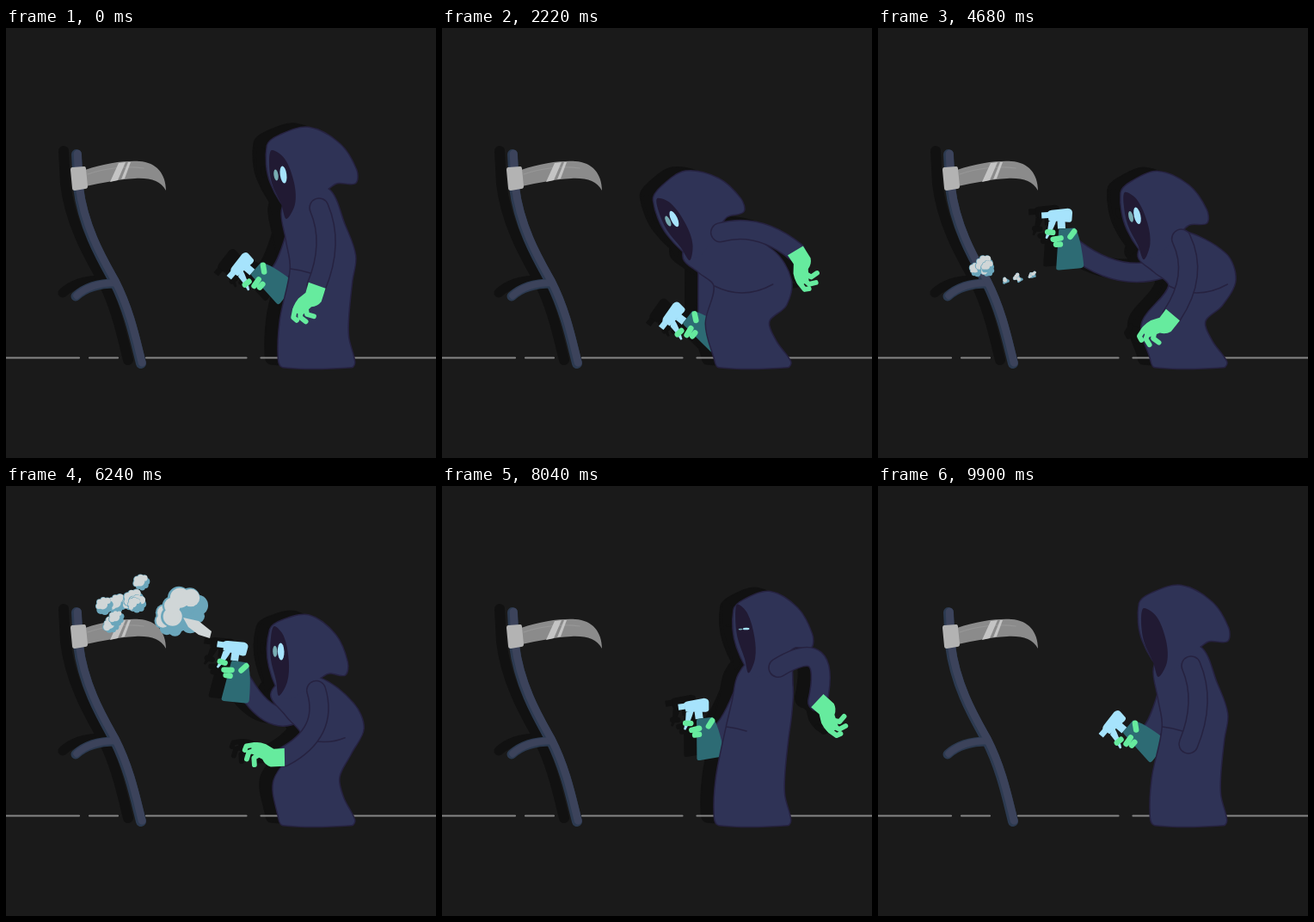
An HTML page with a canvas for the animation above (9.93 s loop, 500 px wide and 500 px high).

```html
<!DOCTYPE html>
<html lang="en">
<head>
<meta charset="utf-8">
<title>Cleaning the scythe</title>
<style>
html, body { margin: 0; height: 100%; overflow: hidden; background: #1a1a1a; }
canvas { display: block; width: 100vw; height: 100vh; }
</style>
</head>
<body>
<canvas id="stage" width="500" height="500"></canvas>
<script>
const g = document.getElementById('stage').getContext('2d');
const LOOP = 9930, LAST = 9900, SHADOW = '#111111';
const CLOAK = '#2f3356', EDGE = '#262240', GREEN = '#66eb9e', ICE = '#a6e3fc';

// head: x, y, angle, turn; stance: squat, eye opening; hand and bottle: x, y, angle
const rest = { head: [304, 140, 0, 0], stance: [0, 1], hand: [361, 300, 120], bottle: [290, 280, -49] };
const windUp = { ...rest, head: [306, 136, 2, 0], hand: [436, 238, 50] };
const crouch = { head: [247, 203, -17, .3], stance: [1, 1], hand: [411, 260, 70], bottle: [285, 337, -52] };
const low = { head: [283, 195, -5, .3], stance: [1, 1], hand: [342, 334, 141], bottle: [219, 233, -3] };
const aim = { head: [307, 170, 6, .5], stance: [.6, 1], hand: [323, 315, 190], bottle: [271, 204, 8] };
const inspect = { head: [351, 148, 0, .8], stance: [0, .14], hand: [329, 216, 255], bottle: [309, 267, 5] };
const cast = { ...inspect, hand: [460, 236, 35] };
const nod = { ...rest, head: [301, 145, 0, 0], stance: [0, .07], hand: [358, 300, 120] };
const keys = [
  [0, rest], [200, rest], [720, windUp], [1450, crouch], [2260, crouch], [2650, aim], [3650, aim],
  [4100, low], [5150, low], [5650, aim], [6750, aim], [7230, inspect], [7550, inspect],
  [7880, cast], [8400, nod], [8650, nod], [8950, rest], [LOOP, rest]
];

const HOOD = [0, -3, 14, -15, 48, -24, 84, -5, 103, 25, 102, 40, 81, 40, 70, 47, 31, 75, 4, 40];
const FACE = [5, 2, 20, 12, 31, 40, 32, 65, 22, 82, 16, 65, 5, 40, 2, 15];

const clamp = v => Math.max(0, Math.min(1, v));
const ease = v => v * v * (3 - 2 * v);
const rad = d => d * Math.PI / 180;
const mix = (a, b, k) => a.map((v, i) => v + (b[i] - v) * k);
const move = ([x, y], dx, dy) => [x + dx, y + dy];
const random = n => { const v = Math.sin(n * 12.9898) * 43758.5453; return v - Math.floor(v); };
const mapPoints = (flat, f) => flat.flatMap((x, i) => i % 2 ? [] : f(x, flat[i + 1]));

function spin(x, y, [ox, oy, angle]) {
  const c = Math.cos(rad(angle)), s = Math.sin(rad(angle));
  return [ox + x * c - y * s, oy + x * s + y * c];
}

function poseAt(t) {
  const i = keys.findIndex(k => k[0] > t);
  const [t0, a] = keys[i - 1], [t1, b] = keys[i];
  const k = ease((t - t0) / (t1 - t0)), p = {};
  for (const part in a) p[part] = mix(a[part], b[part], k);
  return p;
}

// two bones from shoulder to wrist
function elbow([sx, sy], [wx, wy], upper = 44, fore = 49) {
  const dist = Math.hypot(wx - sx, wy - sy), d = Math.min(dist, upper + fore);
  const ux = (wx - sx) / dist, uy = (wy - sy) / dist;
  const along = (upper ** 2 - fore ** 2 + d * d) / (2 * d);
  const out = Math.sqrt(Math.max(0, upper ** 2 - along ** 2));
  return [sx + ux * along + uy * out, sy + uy * along - ux * out];
}

// the feet stay, the hips follow the squat and the chest follows the head
function rig({ head, stance: [squat], hand, bottle }) {
  const turn = head[3], lean = head[0] - 304;
  const onHood = (x, y) => spin(x * (1 - .2 * turn), y, head);
  const onFace = (x, y) => spin(x * (1 - .38 * turn), y - 19 * turn, head);
  const nape = onHood(70, 47), chest = onHood(17 - 28 * turn * turn, 72);
  const upright = 1 - clamp(turn - .5) / .3;
  const follow = squat * lean;
  const waist = [331 + 20 * squat + .6 * follow, 280 + 20 * squat];
  const rump = [406 + 15 * squat + .27 * follow, 265 + 28 * squat];
  const belly = mix(chest, waist, .5);
  const back = move(mix(nape, rump, .5), 4 + 16 * squat, 4 - 6 * squat);
  const shoulder = move(nape, -10 + 10 * squat, 9 + 13 * upright - 13 * squat * upright);
  const side = move(belly, 10, -3), grip = spin(8, 24, bottle);
  const sag = 8 + Math.max(0, side[1] - grip[1]) * .25;
  return {
    onFace,
    hood: smooth(mapPoints(HOOD, onHood)),
    face: smooth(mapPoints(FACE, onFace)),
    body: smooth([
      ...onHood(30, 50), ...chest, ...belly, ...waist, 319 - 12 * squat, 340 + 4 * squat,
      317, 384, 322, 394, 402, 394, 405, 388,
      398 - 10 * squat, 360 + 4 * squat, 398 - 18 * squat, 335 + 6 * squat,
      402 - 2 * squat, 295 + 27 * squat, ...rump, ...back, ...nape]),
    fold: [...waist, ...move(waist, 12 + 22 * squat, 2 + 6 * squat), ...move(waist, 23 + 45 * squat, 5 - 7 * squat)],
    near: [...shoulder, ...elbow(shoulder, hand), hand[0], hand[1]],
    far: [...side, ...move(mix(side, grip, .5), 0, sag), ...grip]
  };
}

// closed curve through the points, with handles scaled to the segment length
function smooth(flat) {
  const n = flat.length / 2, path = new Path2D();
  const at = i => { i = (i + n) % n; return [flat[2 * i], flat[2 * i + 1]]; };
  const gap = (a, b) => Math.hypot(a[0] - b[0], a[1] - b[1]);
  path.moveTo(...at(0));
  for (let i = 0; i < n; i++) {
    const [a, b, c, d] = [at(i - 1), at(i), at(i + 1), at(i + 2)], len = gap(b, c);
    const u = len / (gap(a, b) + len) / 3, v = len / (gap(c, d) + len) / 3;
    path.bezierCurveTo(b[0] + (c[0] - a[0]) * u, b[1] + (c[1] - a[1]) * u,
      c[0] - (d[0] - b[0]) * v, c[1] - (d[1] - b[1]) * v, ...c);
  }
  path.closePath();
  return path;
}

// quadratic curve whose middle passes through the second point
function bend([ax, ay, mx, my, bx, by]) {
  const path = new Path2D();
  path.moveTo(ax, ay);
  path.quadraticCurveTo(2 * mx - (ax + bx) / 2, 2 * my - (ay + by) / 2, bx, by);
  return path;
}

function fill(path, color) {
  g.fillStyle = color;
  g.fill(typeof path === 'string' ? new Path2D(path) : path);
}
function stroke(path, color, width) {
  g.strokeStyle = color;
  g.lineWidth = width;
  g.stroke(typeof path === 'string' ? new Path2D(path) : path);
}
function oval(x, y, rx, ry, color, tilt = 0) {
  g.fillStyle = color;
  g.beginPath();
  g.ellipse(x, y, rx, ry, rad(tilt), 0, 7);
  g.fill();
}
function placed([x, y, angle], draw) {
  g.save();
  g.translate(x, y);
  g.rotate(rad(angle));
  draw();
  g.restore();
}

function sleeve(points, c) {
  stroke(bend(points), c(EDGE), 23.5);
  stroke(bend(points), c(CLOAK), 20.5);
}

function drawBottle(c) {
  fill('M-18-10H-11Q-14-1-23 11L-25 10Q-21 0-20-9Z', c(ICE));
  fill('M-10-9H-1V0H-10Z', c(ICE));
  fill('M-8 0H10Q16 10 18 43Q18 47 14 47L-11 48Q-15 48-14 44L-9 2Z', c('#2d6b74'));
  fill('M-21-20Q-19-22-16-22L3-23Q8-22 8-18L7-10Q7-7 3-7L-20-10Z', c(ICE));
  fill('M-28-20H-20V-13H-28Z', c(ICE));
  stroke('M4 10L9 4M-22 3L-16 4M-16 12L-7 11M-13 18L-8 18', c(GREEN), 6.5);
}

function drawHand(c) {
  fill('M1 10L-3-10.5L13-14Q20-13 24-7L37-3L40 8Q36 13 23 11L13 7Z', c(GREEN));
  stroke('M28-2L34-7L32-15M34 2L41-2L42-10M36 8L45 5L46 0', c(GREEN), 5.8);
}

function drawReaper(p, t, shade) {
  const c = color => shade || color, r = rig(p);
  sleeve(r.far, c);
  placed(p.bottle, () => drawBottle(c));
  for (const part of [r.body, r.hood]) stroke(part, c(EDGE), 3);
  for (const part of [r.body, r.hood]) fill(part, c(CLOAK));
  fill(r.face, c('#211a33'));
  if (t < LAST) {
    const lid = p.stance[1], tilt = p.head[2] - 8 * lid;
    oval(...r.onFace(10, 31), 2.6, 6.5 * lid, c('#78adb3'), tilt);
    oval(...r.onFace(18.5, 30.5), 3.8, 10 * lid, c(ICE), tilt);
  }
  stroke(bend(r.fold), c(EDGE), 1.5);
  sleeve(r.near, c);
  if (t < LAST) placed(p.hand, () => drawHand(c));
}

function drawHandle(shade) {
  const pole = 'M82 147L84 185C90 235 115 275 126 295C143 328 150 362 157 390';
  const branch = 'M81 312Q97 297 127 297';
  stroke(branch, shade || '#2c3a50', 11);
  stroke(pole, shade || '#2c3a50', 12);
  if (shade) return;
  placed([1.2, -.8, 0], () => {
    stroke(branch, '#3c435b', 8);
    stroke(pole, '#3c435b', 9);
  });
}

function drawBlade() {
  fill('M92 165C115 157 140 154 155 155C175 156 186 170 186 189C180 178 168 174 150 175C130 176 112 180 93 184Z', '#8b8b8b');
  stroke('M95 170C115 163 140 160 160 163', '#979797', 1.2);
  fill('M121 179L131 157L139 156L130 177ZM134 176L142 156L145 156L138 175Z', '#c4c4c4');
  fill('M77 162L91 161Q93 161 93 164L95 184Q95 187 92 187L80 189Q77 189 77 186L75 165Q75 162 77 162Z', '#b3b3b3');
}

// foam spreads from the nozzle along a line; dust forms in place
const FOAM = ['#6ba6bb', '#d0d6d7'], DUST = ['#526f8f', '#7b9a9a'];
const HIGH = [248, 187], DEEP = [194, 217];
const cloud = (start, end, from, line, spread, count, size, colors) =>
  ({ start, end, from, line, spread, count, size, colors });
const clouds = [
  cloud(2880, 4060, HIGH, [107, 155, 146, 82], 12, 9, 13, FOAM),
  cloud(2780, 4060, HIGH, [188, 164, 207, 130], 3, 2, 30, FOAM),
  cloud(4300, 5110, DEEP, [108, 280, 134, 284], 6, 4, 11, FOAM),
  cloud(4380, 5110, DEEP, [148, 297, 186, 290], 4, 5, 5, FOAM),
  cloud(5850, 7080, HIGH, [106, 152, 162, 124], 14, 9, 12, FOAM),
  cloud(5750, 7080, HIGH, [190, 163, 214, 141], 2, 2, 30, FOAM),
  cloud(8220, 8970, null, [118, 282, 144, 288], 4, 3, 18, DUST),
  cloud(8240, 8970, null, [112, 185, 112, 234], 9, 6, 13, DUST),
  cloud(8260, 8970, null, [176, 181, 222, 196], 7, 5, 10, DUST),
  cloud(8280, 8970, null, [185, 263, 211, 273], 6, 4, 10, DUST),
  cloud(8260, 8970, null, [98, 236, 182, 264], 14, 12, 3.5, DUST)
];

// lobes shrink while keeping their places, so a fading puff breaks into dots
function drawPuff(x, y, r, grow, fade, seed, [dark, light]) {
  const lobes = r < 5 ? 3 : 8, list = [[x, y, r * .66 * grow * fade, Math.PI / 2]];
  for (let i = 0; i < lobes; i++) {
    const a = (i / lobes * 2 + random(seed)) * Math.PI;
    const size = r * (.3 + .2 * random(seed + i * 7 + 1)) * grow * fade;
    list.push([x + Math.cos(a) * r * .62 * grow, y + Math.sin(a) * r * .62 * grow, size, a]);
  }
  for (const [lx, ly, s] of list) oval(lx, ly, s, s, dark);
  if (r < 20) oval(x - r * .15, y - r * .1, r * .55 * grow * fade, r * .55 * grow * fade, light);
  for (const [lx, ly, s, a] of list)
    if (Math.cos(a) + Math.sin(a) < .1) oval(lx + s * .1, ly, s * .88, s * .88, light);
}

function drawCloud({ start, end, from, line, spread, count, size, colors }, t) {
  if (t < start || t >= end) return;
  for (let i = 0; i < count; i++) {
    const seed = start + i * 17, age = t - start - i * 18;
    const fade = clamp((end - 90 * random(seed + 2) - t) / 300);
    if (age < 0 || !fade) continue;
    const jitter = n => spread * (2 * random(seed + n) - 1);
    const goal = move(mix(line.slice(0, 2), line.slice(2), (i + .5) / count), jitter(3), jitter(4));
    const [x, y] = mix(from || goal, goal, 1 - (1 - clamp(age / 200)) ** 3);
    drawPuff(x, y - age * .006, size * (.6 + .4 * random(seed + 5)), clamp(age / 190), fade, seed, colors);
  }
  // big clouds trail a plume towards the nozzle
  if (size > 20 && t < end - 500) placed([...from, 0], () =>
    fill('M-42-34L-24-30L-9-18L-11-10L-24-14L-36-23Z', colors[1]));
}

function frame() {
  const t = performance.now() % LOOP, pose = poseAt(t);
  g.fillStyle = '#1a1a1a';
  g.fillRect(0, 0, 500, 500);
  g.lineJoin = g.lineCap = 'round';
  if (t < LAST) placed([-15, -4, 0], () => {
    drawHandle(SHADOW);
    drawReaper(pose, t, SHADOW);
  });
  stroke('M-3 383.5H85M97 383.5H130M163 383.5H279.5M296.5 383.5H503', '#868686', 2.2);
  drawHandle();
  drawBlade();
  for (const item of clouds) drawCloud(item, t);
  drawReaper(pose, t);
  requestAnimationFrame(frame);
}
frame();
</script>
</body>
</html>
```
